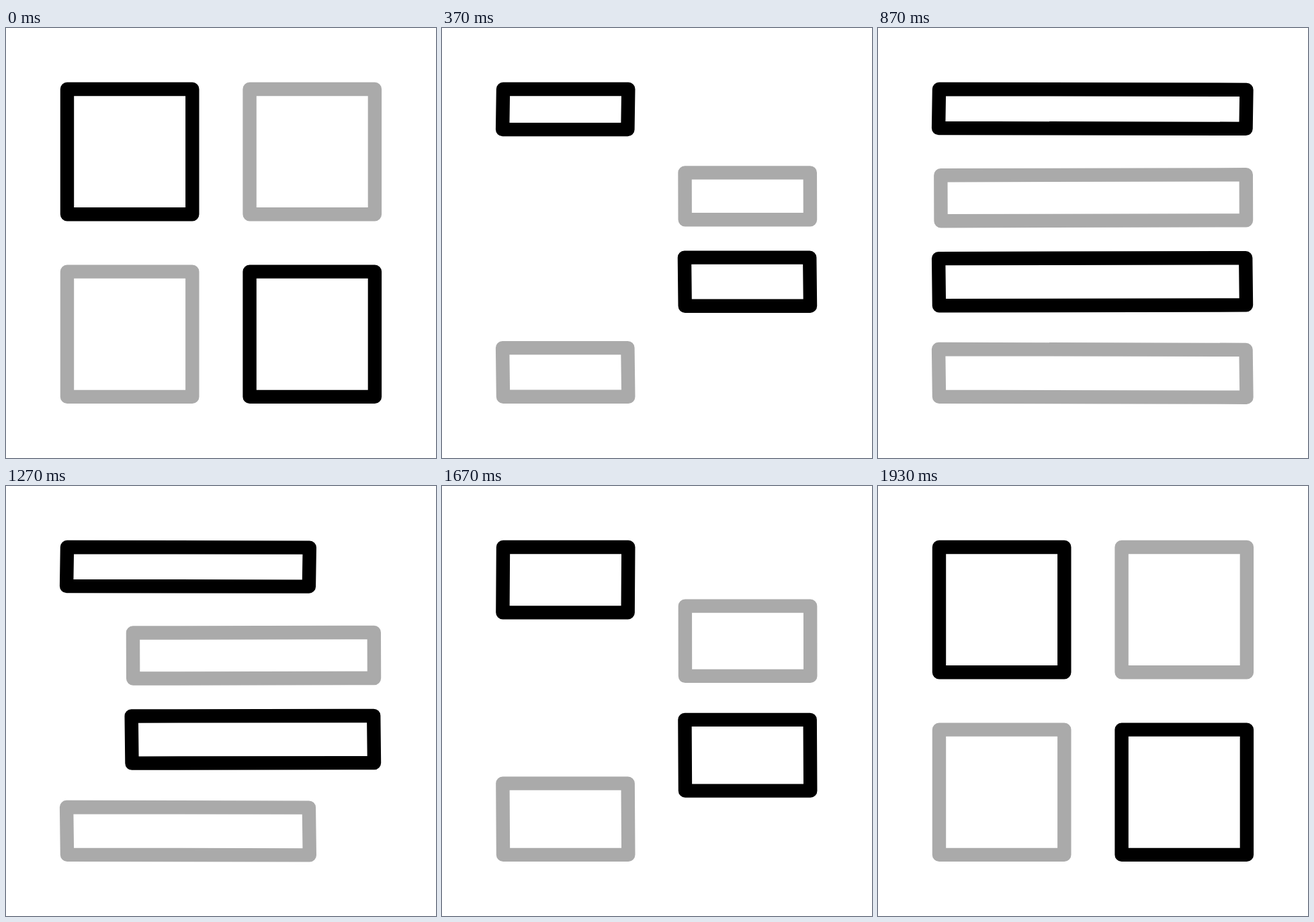
An HTML page that plays this animation: 640 px wide and 640 px high, repeating every 2000 ms.

```html
<!DOCTYPE html>
<html lang="en">
<head>
<meta charset="utf-8">
<title>Boxes and bars</title>
<style>
  html, body { margin: 0; width: 100%; height: 100%; overflow: hidden; background: #fff; }
  svg { display: block; width: 100%; height: 100%; }
  polygon { fill: none; stroke-width: 20.4; stroke-linejoin: round; }
</style>
</head>
<body>
<svg viewBox="0 0 640 640"></svg>
<script>
const LOOP = 2000;
const EDGE = 91, GAP = 271.6, SIDE = 186.3;
const TILT = 0.9;
const svg = document.querySelector('svg');

// Grid cell, then the bar it becomes: top, height, sideways lean, growth
const boxes = [
  { col: 0, row: 0, top: 91, height: 58, lean: -0.9, grow: 271.2 },
  { col: 1, row: 0, top: 217.4, height: 68, lean: 0.2, grow: 268.2 },
  { col: 1, row: 1, top: 341.3, height: 70.2, lean: 0.8, grow: 270.8 },
  { col: 0, row: 1, top: 478, height: 70.8, lean: 0.9, grow: 271.2 }
];

// Steps: time in 1/30 s, flatness, stretch
const steps = [
  [0, 0, 0], [11.9, 1, 0], [26.1, 1, 1],
  [33, 1, 1], [45.4, 1, 0], [57.9, 0, 0], [60, 0, 0]
];

for (const box of boxes) {
  box.el = document.createElementNS('http://www.w3.org/2000/svg', 'polygon');
  box.el.setAttribute('stroke', box.col === box.row ? '#000' : '#aaa');
  svg.append(box.el);
}

const mix = (a, b, p) => a + (b - a) * p;
const ease = u => u * u * (3 - 2 * u);

// Left boxes grow to the right, right boxes to the left; the growing end sinks.
function corners({ col, row, top, height, lean, grow }, flat, stretch) {
  const x = EDGE + col * GAP - flat * (col * TILT + Math.max(0, lean));
  const y = mix(EDGE + row * GAP, top, flat) + col * stretch * TILT;
  const h = mix(SIDE, height, flat);
  const left = x - col * grow * stretch;
  const right = x + SIDE + (1 - col) * grow * stretch;
  const yLeft = y + col * stretch * TILT;
  const yRight = y + (1 - col) * stretch * TILT;
  const shift = lean * flat;
  return [left, yLeft, right, yRight, right + shift, yRight + h, left + shift, yLeft + h];
}

// Ticks of 1/30 s, each starting on a whole 10 ms
function tickAt(ms) {
  const n = Math.round(ms * 0.03);
  return Math.round(n * 10 / 3) * 10 > ms ? n - 1 : n;
}

function draw(ms) {
  const tick = tickAt(ms);
  const i = Math.max(1, steps.findIndex(s => s[0] >= tick));
  const [t0, flat0, stretch0] = steps[i - 1];
  const [t1, flat1, stretch1] = steps[i];
  const p = ease((tick - t0) / (t1 - t0));
  for (const box of boxes) {
    const points = corners(box, mix(flat0, flat1, p), mix(stretch0, stretch1, p));
    box.el.setAttribute('points', points.map(v => v.toFixed(2)).join(' '));
  }
}

const start = performance.now();
function loop() {
  draw((performance.now() - start) % LOOP);
  requestAnimationFrame(loop);
}
draw(0);
requestAnimationFrame(loop);
</script>
</body>
</html>
```
